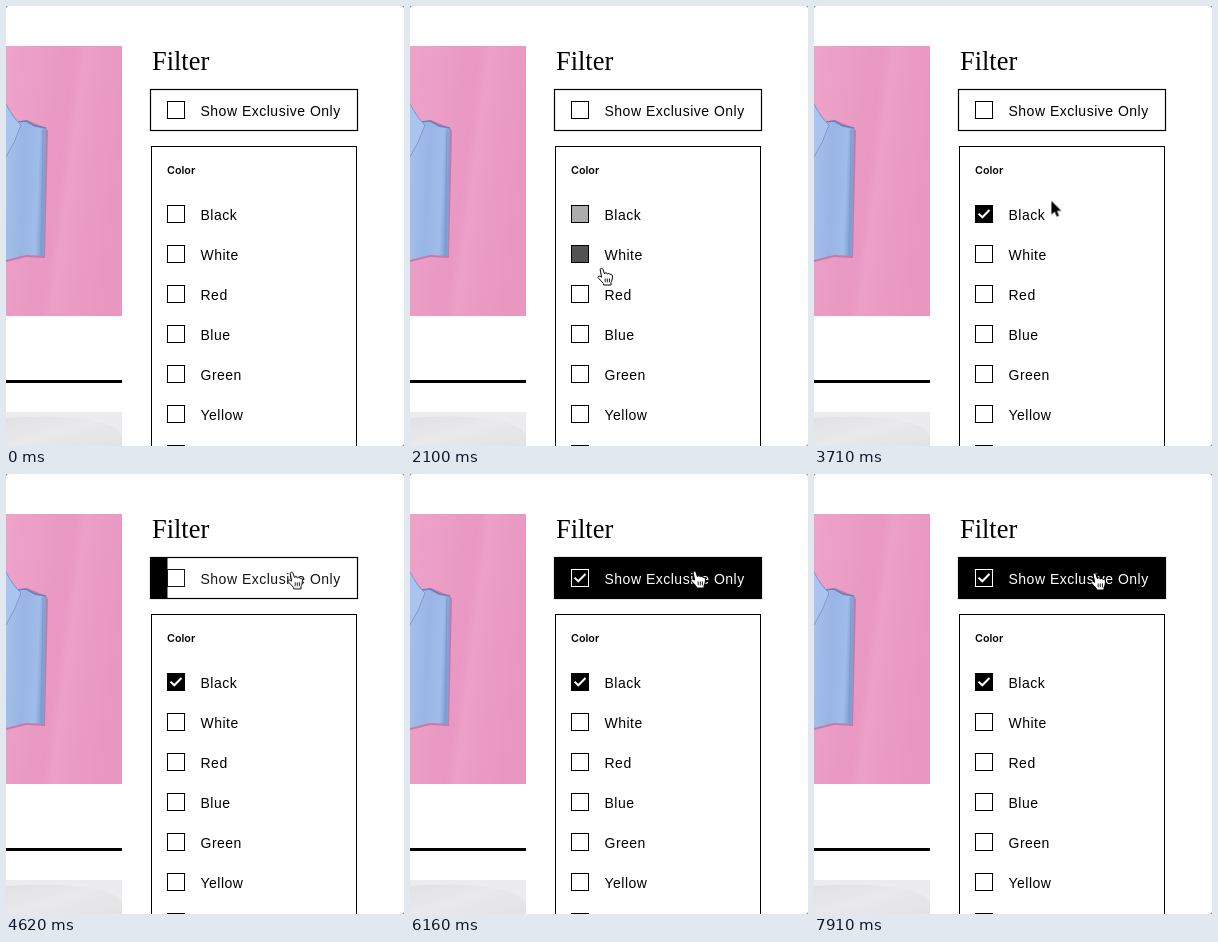
Animation, 398 px wide and 440 px high, one loop 8 s. Source, as an HTML page:

```html
<!DOCTYPE html>
<html lang="en">
<head>
<meta charset="utf-8">
<title>Filter</title>
<style>
  html, body { margin: 0; width: 100%; height: 100%; overflow: hidden; background: #8a8a8a; }
  svg { display: block; }
  text { font: 14px "Liberation Sans", Arial, sans-serif; letter-spacing: .5px; }
  .title { font: 26.4px "Liberation Serif", Tinos, serif; letter-spacing: 0; }
  .heading { font: 600 10.8px Inter, sans-serif; letter-spacing: 0; }
  .line { fill: none; stroke: currentColor; }
  .tick { fill: none; stroke: #fff; stroke-width: 2; }

  .anim { animation: 8s ease-in-out infinite; }
  .hard { animation: 8s step-end infinite; }

  #sweep { animation-name: sweep; transform-origin: 144px 0; }
  #exclusive { animation-name: invert; }
  #exclusiveTick { animation-name: tickExclusive; }
  #blackFill { animation-name: fillBlack; }
  #blackTick { animation-name: tickBlack; }
  #whiteFill { animation-name: fillWhite; }
  #cursor { animation-name: move; }
  #arrow { animation-name: arrow; }
  #hand { animation-name: hand; }
  #ring { animation-name: ring; }

  @keyframes sweep {
    0%, 56.875% { transform: scaleX(0); }
    61.25%, 80.94% { transform: scaleX(1); }
    85.31%, 94.5% { transform: scaleX(0); }
    98.875%, 100% { transform: scaleX(1); }
  }
  @keyframes invert {
    0%, 56.875% { color: #000; }
    61.25%, 80.94% { color: #fff; }
    85.31%, 94.5% { color: #000; }
    98.875%, 100% { color: #fff; }
  }
  @keyframes tickExclusive { 0%, 73.2% { opacity: 0; } 77.8%, 100% { opacity: 1; } }
  @keyframes tickBlack { 0%, 36.5% { opacity: 0; } 41.1%, 100% { opacity: 1; } }
  @keyframes fillBlack {
    0%, 8.75% { opacity: 0; }
    13%, 23.6% { opacity: 1; }
    28%, 32.5% { opacity: 0; }
    36.9%, 100% { opacity: 1; }
  }
  @keyframes fillWhite {
    0%, 23.6% { opacity: 0; }
    28%, 32.5% { opacity: 1; }
    36.9%, 100% { opacity: 0; }
  }
  @keyframes move {
    0%, 6.6% { transform: translate(351px, 200px); }
    12.25%, 21.5% { transform: translate(185px, 216px); }
    25.4%, 28.9% { transform: translate(192px, 262px); }
    33.5%, 44% { transform: translate(195px, 210px); }
    49%, 54.6% { transform: translate(287px, 176px); }
    58%, 71% { transform: translate(286px, 97px); }
    71.7%, 80% { transform: translate(285px, 97px); }
    83.2%, 92.2% { transform: translate(305px, 54px); }
    96.25%, 100% { transform: translate(281px, 99px); }
  }
  @keyframes arrow {
    0% { opacity: 0; } 7% { opacity: 1; } 8.75% { opacity: 0; }
    45.6% { opacity: 1; } 56.875% { opacity: 0; }
    80.94% { opacity: 1; } 94.5%, 100% { opacity: 0; }
  }
  @keyframes hand {
    0% { opacity: 0; } 8.75% { opacity: 1; }
    45.6% { opacity: 0; } 56.875% { opacity: 1; }
    80.94% { opacity: 0; } 94.5%, 100% { opacity: 1; }
  }
  @keyframes ring {
    0% { opacity: 0; } 35% { opacity: 1; } 36.75% { opacity: 0; }
    71.75% { opacity: 1; } 73.5%, 100% { opacity: 0; }
  }
</style>
</head>
<body>
<svg width="398" height="440" viewBox="0 0 398 440">
  <defs>
    <linearGradient id="pink" x2="1" y2=".3">
      <stop offset="0" stop-color="#eea3c9"/>
      <stop offset=".55" stop-color="#e898c2"/>
      <stop offset=".63" stop-color="#ec9fc7"/>
      <stop offset="1" stop-color="#e897c1"/>
    </linearGradient>
    <linearGradient id="denim" x2="1" y2=".15">
      <stop offset="0" stop-color="#a6c1ec"/>
      <stop offset=".5" stop-color="#98b5e4"/>
      <stop offset=".85" stop-color="#a0bcea"/>
      <stop offset="1" stop-color="#829fd2"/>
    </linearGradient>
    <linearGradient id="fabric" x2="1" y2="1">
      <stop offset="0" stop-color="#e0e0e2"/>
      <stop offset=".5" stop-color="#e9e9eb"/>
      <stop offset="1" stop-color="#e3e3e5"/>
    </linearGradient>
    <rect id="box" class="line" x="161.5" width="17" height="17"/>
    <path id="check" class="tick" d="M164.5 8.6l3.8 3.7 7.2-7.3"/>
  </defs>

  <rect width="398" height="440" rx="3" fill="#fff"/>

  <rect y="40" width="116" height="270" fill="url(#pink)"/>
  <path d="M0 99L12 116 21 114 40 122 42 125 39 252 20 251 0 256z" fill="#c878a9"/>
  <path d="M0 98L11 116 20 115 29 120 40 122 38 250 20 249 0 254z" fill="url(#denim)"/>
  <path d="M11 116l9-1 9 5 11 2" fill="none" stroke="#6682b9" stroke-width="1.5"/>
  <path d="M0 98Q7 112 15 119 9 137 0 151z" fill="#a9c4ef"/>
  <path d="M0 98Q7 112 15 119 9 137 0 151M37 124L35 249" fill="none" stroke="#7d9acd"/>

  <rect y="374" width="116" height="3"/>
  <rect y="406" width="116" height="34" fill="url(#fabric)"/>
  <path d="M0 412Q50 408 84 414T116 434V406H0z" fill="#ececee"/>

  <text class="title" x="146" y="63.5">Filter</text>

  <rect class="line" x="144.5" y="83.5" width="207" height="41" stroke-width="1.2"/>
  <rect id="sweep" class="anim" x="144" y="83" width="208" height="42"/>
  <g id="exclusive" class="anim">
    <g id="exclusiveTick" class="anim">
      <rect x="162" y="96" width="16" height="16"/>
      <use href="#check" y="95"/>
    </g>
    <use href="#box" y="95.5"/>
    <text x="194.5" y="110" fill="currentColor">Show Exclusive Only</text>
  </g>

  <rect class="line" x="145.5" y="140.5" width="205" height="320"/>
  <text class="heading" x="161" y="168">Color</text>
  <rect id="blackFill" class="anim" x="161" y="199" width="18" height="18"/>
  <rect id="whiteFill" class="anim" x="161" y="239" width="18" height="18"/>
  <g id="colors"></g>
  <g id="blackTick" class="anim"><use href="#check" y="199"/></g>

  <g id="cursor" class="anim">
    <g id="ring" class="hard" fill="none">
      <circle r="30.3" stroke="#fff" stroke-width="4"/>
      <circle r="30.3" stroke="#000" stroke-width="1.8"/>
    </g>
    <path id="arrow" class="hard" stroke="#fff" stroke-width="1.6" paint-order="stroke"
      d="M0 .5V14.2L3.2 11.2 5.4 16.2 7.6 15.2 5.5 10.4H9.8z"/>
    <g id="hand" class="hard" stroke="#000">
      <path fill="#fff" d="M-1.8 2C-2.2 .2 .4-.4 1 1.4L2.4 5.6C3 4.4 5 4.6 5.4 6 6 5 7.8 5.2 8 6.6 9 5.8 10.4 6.4 10.4 8 10.6 11 9.8 13 9 14.6V17H1.6L1.4 15.6C0 13.6-2 11.6-3.6 10.2-4.8 9-3.2 7.4-1.8 8.4L-.4 9.2z"/>
      <path d="M3.2 10.5v3.8M5.3 10.5v3.8M7.4 10.5v3.8" stroke-width=".9"/>
    </g>
  </g>
</svg>
<script>
  const names = ["Black", "White", "Red", "Blue", "Green", "Yellow", ""];
  document.getElementById("colors").innerHTML = names.map((name, i) => {
    const y = 199 + i * 40;
    return `<use href="#box" y="${y + 0.5}"/><text x="194.5" y="${y + 15}">${name}</text>`;
  }).join("");
</script>
</body>
</html>
```
